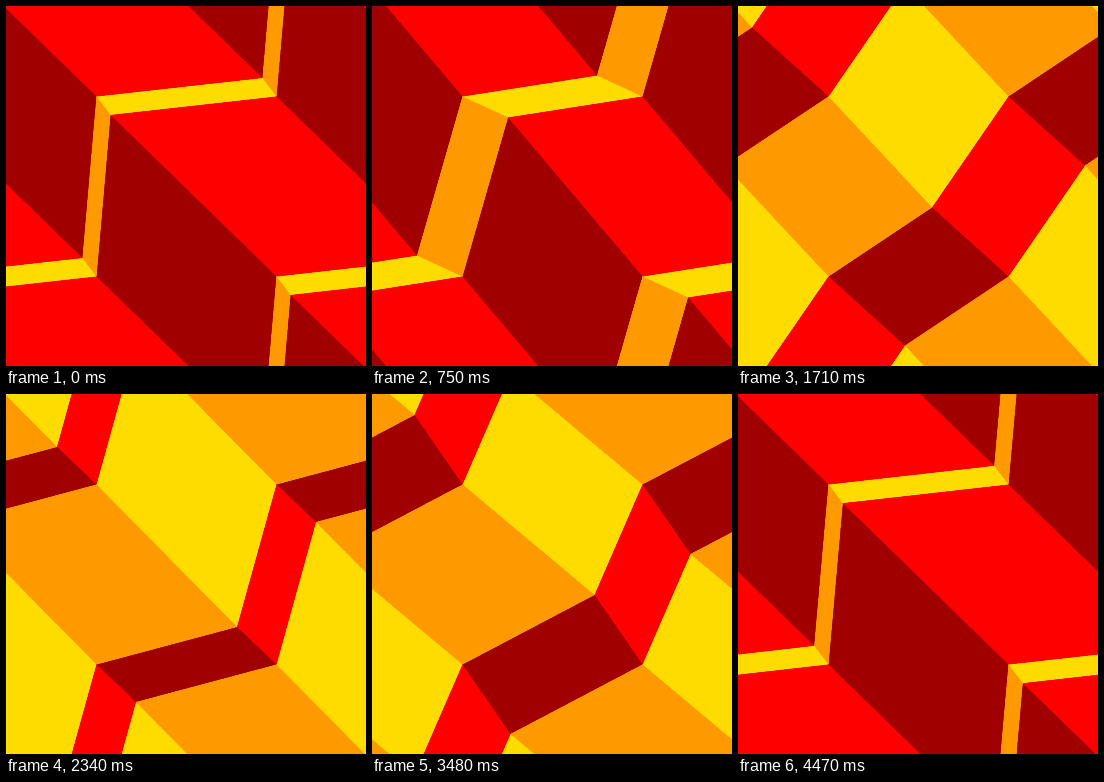
An HTML page for the animation above (4.5 s loop, 360 by 360 pixels).

```html
<!DOCTYPE html>
<html lang="en">
<head>
<meta charset="utf-8">
<title>Folding tiles</title>
<style>
  html, body { margin: 0; width: 100%; height: 100%; overflow: hidden; background: #a00000; }
  svg { display: block; width: 360px; height: 360px; }
</style>
</head>
<body>
<svg viewBox="0 0 360 360">
  <g id="tiles" transform="translate(.5 .5)"></g>
</svg>
<script>
const LOOP = 4500, STEP = 30, CELL = 180, HALF = CELL / 2;
const COLORS = ['#ffdc00', '#ff0000', '#a00000', '#ff9900']; // top, right, bottom, left

// Key points of the inner vertex: time, x, y from the cell centre
const KEYS = [
  [0, -76, -71.5],
  [750, -44.5, -69],
  [1710, 13.5, 21],
  [2340, 50.5, 52.5],
  [3000, 68.5, 73],
  [3480, 42, 20.5],
  [LOOP, -76, -71.5]
];

// Corners clockwise from the top left
const corner = i => [i % 4 % 3 ? HALF : -HALF, i % 4 > 1 ? HALF : -HALF];

const tiles = document.getElementById('tiles');
const addLayer = rendering => COLORS.map(color => {
  const path = document.createElementNS('http://www.w3.org/2000/svg', 'path');
  path.setAttribute('fill', color);
  path.setAttribute('shape-rendering', rendering);
  return tiles.appendChild(path);
});
// The hard-edged layer below keeps the smooth one free of seams
const layers = [addLayer('crispEdges'), addLayer('geometricPrecision')];

const rate = (i, k) => (KEYS[i + 1][k] - KEYS[i][k]) / (KEYS[i + 1][0] - KEYS[i][0]);

// At rest at both ends, otherwise the slope of the parabola through three keys
function slope(i, k) {
  if (i === 0 || i === KEYS.length - 1) return 0;
  const before = KEYS[i][0] - KEYS[i - 1][0], after = KEYS[i + 1][0] - KEYS[i][0];
  return (rate(i - 1, k) * after + rate(i, k) * before) / (before + after);
}

function vertexAt(t) {
  const i = KEYS.findIndex(key => key[0] > t) - 1;
  const a = KEYS[i], b = KEYS[i + 1];
  const span = b[0] - a[0], u = (t - a[0]) / span, v = 1 - u;
  return [1, 2].map(k =>
    a[k] * v * v * (1 + 2 * u) + b[k] * u * u * (1 + 2 * v)
    + span * u * v * (slope(i, k) * v - slope(i + 1, k) * u));
}

function triangles(points) {
  let d = '';
  for (let row = 0; row < 3; row++) {
    for (let col = 0; col < 3; col++) {
      // Every other cell is turned by half a revolution
      const sign = (row + col) % 2 ? -1 : 1;
      d += 'M' + points.map(([x, y]) =>
        (col * CELL + sign * x).toFixed(2) + ' ' + (row * CELL + sign * y).toFixed(2)
      ).join('L') + 'Z';
    }
  }
  return d;
}

function draw(t) {
  const vertex = vertexAt(t);
  COLORS.forEach((_, side) => {
    const d = triangles([corner(side), corner(side + 1), vertex]);
    layers.forEach(layer => layer[side].setAttribute('d', d));
  });
}

const start = performance.now();
function tick() {
  const t = (performance.now() - start) % LOOP;
  draw(Math.floor(t / STEP) * STEP);
  requestAnimationFrame(tick);
}
tick();
</script>
</body>
</html>
```
